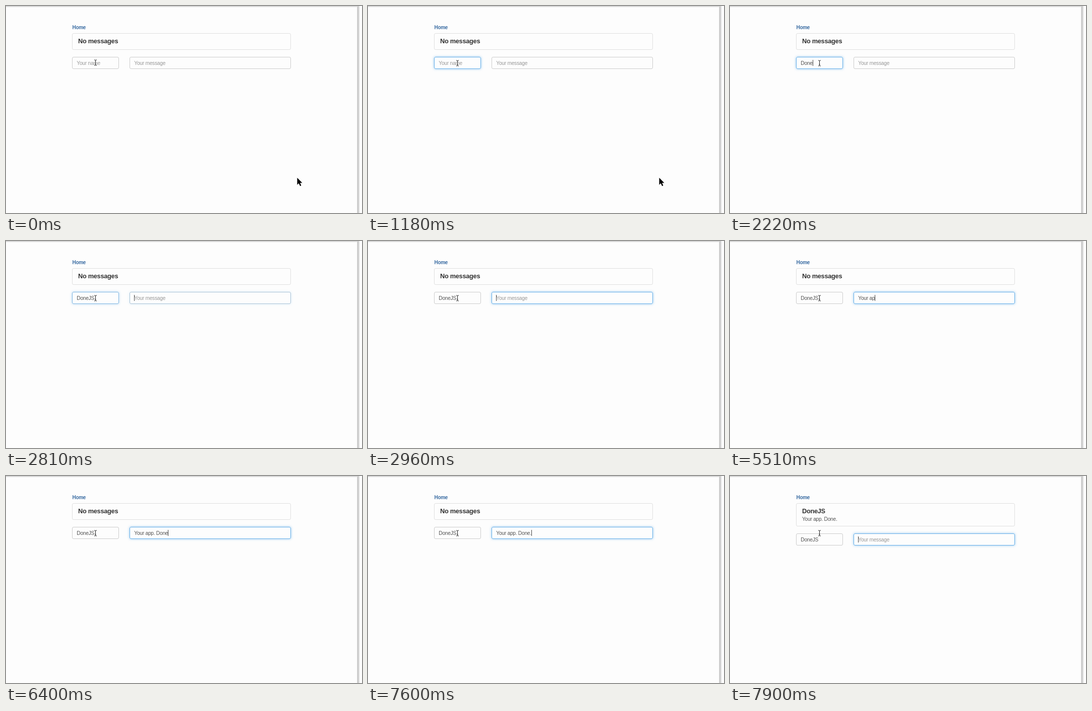
These frames come from a looping animation (706 by 411 pixels, 8 s). An HTML page:

```html
<!DOCTYPE html>
<html lang="en">
<head>
<meta charset="utf-8">
<title>Chat form</title>
<style>
  html, body { margin: 0; width: 100%; height: 100%; overflow: hidden; background: #fdfdfd; }
  body { position: relative; font: 10.2px "Liberation Sans", Arial, sans-serif; letter-spacing: -.25px; color: #555; }
  div, svg { position: absolute; box-sizing: border-box; white-space: pre; }
  .top { left: 0; top: 0; width: 697px; height: 2px; background: #d9d9d9; }
  .side { left: 696px; top: 0; width: 6px; height: 411px; background: linear-gradient(90deg, #e4e4e4, #c6c6c6 25%, #d2d2d2 55%, #fdfdfd); }
  .home { left: 131.5px; top: 37px; font-weight: bold; font-size: 10px; line-height: 12px; letter-spacing: -.3px; color: #3b6da3; }
  .panel { left: 131px; top: 54px; width: 434px; border: 1px solid #e0e0e0; border-radius: 3px; }
  .title { left: 11px; top: 7px; font-weight: bold; font-size: 12.8px; line-height: 15px; letter-spacing: -.3px; color: #333; }
  .body { left: 11px; top: 25px; line-height: 12px; }
  .field { height: 24px; padding-left: 8.3px; border: 1px solid; border-radius: 3px; line-height: 23px; }
  .caret { position: absolute; top: 5px; width: 1px; height: 12px; background: #444; }
  .hint { color: #999; }
  svg { left: 0; top: 0; }
</style>
</head>
<body>
<div class="top"></div>
<div class="side"></div>
<div class="home">Home</div>
<div class="panel"><div class="title"></div><div class="body"></div></div>
<div class="field" id="name" style="left:131px;width:93px"><span class="text"></span><span class="caret"></span><span class="hint">Your name</span></div>
<div class="field" id="message" style="left:245px;width:320px"><span class="text"></span><span class="caret"></span><span class="hint">Your message</span></div>
<svg width="706" height="411">
  <path id="beam" d="M-2.5-5.5Q0-5.5 0-4.5Q0-5.5 2.5-5.5M0-4.5V4.5M-2.5 5.5Q0 5.5 0 4.5Q0 5.5 2.5 5.5M-1.2 2.5H1.2" fill="none" stroke="#222"/>
  <path id="arrow" d="M0 0V14L3.2 11L5.7 16.6L8 15.6L5.6 10.2H10Z" stroke="#fff" stroke-width="1.2" paint-order="stroke"/>
</svg>
<script>
const LOOP = 8000, SENT = 7900;
const find = selector => document.querySelector(selector);

// Each track lists [start in ms, value]; a value holds until the next start.
const nameText = [[0, ""], [1780, "D"], [1930, "Do"], [2080, "Don"], [2220, "Done"], [2370, "DoneJ"], [2510, "DoneJS"]];
const messageText = [
  [0, ""], [3260, "Y"], [3560, "Yo"], [3710, "You"], [3860, "You "], [4460, "You"], [4760, "Your"],
  [5210, "Your "], [5360, "Your a"], [5510, "Your ap"], [5660, "Your app"], [5810, "Your app. "],
  [5960, "Your app. D"], [6100, "Your app. Do"], [6250, "Your app. Don"], [6400, "Your app. Done"],
  [6550, "Your app. Done."], [SENT, ""]
];
const nameFocus = [[0, 0], [600, .45], [740, 1], [2810, .75], [2960, 0]];
const messageFocus = [[0, 0], [2810, .35], [2960, 1]];
const nameCaret = [[0, 0], [740, 1], [1040, .5], [1180, 0], [1630, 1], [2810, 0]];
const messageCaret = [[0, 0], [2810, 1], [4310, 0], [4460, 1], [7000, 0], [7600, 1]];
const beamY = [[0, 112.5], [1040, 113.5]];
const arrowPlace = [[0, [577.5, 341]], [1630, [621, 349]], [1780, null]];

const at = (track, t) => track.findLast(([start]) => start <= t)[1];

function drawField(id, top, text, focus, caret) {
  const field = find(id);
  field.style.top = top + "px";
  field.style.borderColor = `color-mix(in srgb, #66afe9 ${focus * 100}%, #ccc)`;
  field.style.boxShadow = `0 0 5px rgba(102, 175, 233, ${focus * .65})`;
  field.querySelector(".text").textContent = text;
  field.querySelector(".caret").style.opacity = caret;
  field.querySelector(".hint").hidden = text !== "";
}

function draw(t) {
  const sent = t >= SENT;
  const shift = sent ? 13 : 0;
  find(".panel").style.height = 33 + shift + "px";
  find(".title").textContent = sent ? "DoneJS" : "No messages";
  find(".body").textContent = sent ? "Your app. Done." : "";
  drawField("#name", 101 + shift, at(nameText, t), at(nameFocus, t), at(nameCaret, t));
  drawField("#message", 101 + shift, at(messageText, t), at(messageFocus, t), at(messageCaret, t));

  find("#beam").setAttribute("transform", `translate(177.5 ${at(beamY, t)})`);
  const place = at(arrowPlace, t);
  find("#arrow").style.display = place ? "" : "none";
  if (place) find("#arrow").setAttribute("transform", `translate(${place})`);
}

const begin = performance.now();
function tick() {
  draw((performance.now() - begin) % LOOP);
  requestAnimationFrame(tick);
}
tick();
</script>
</body>
</html>
```
